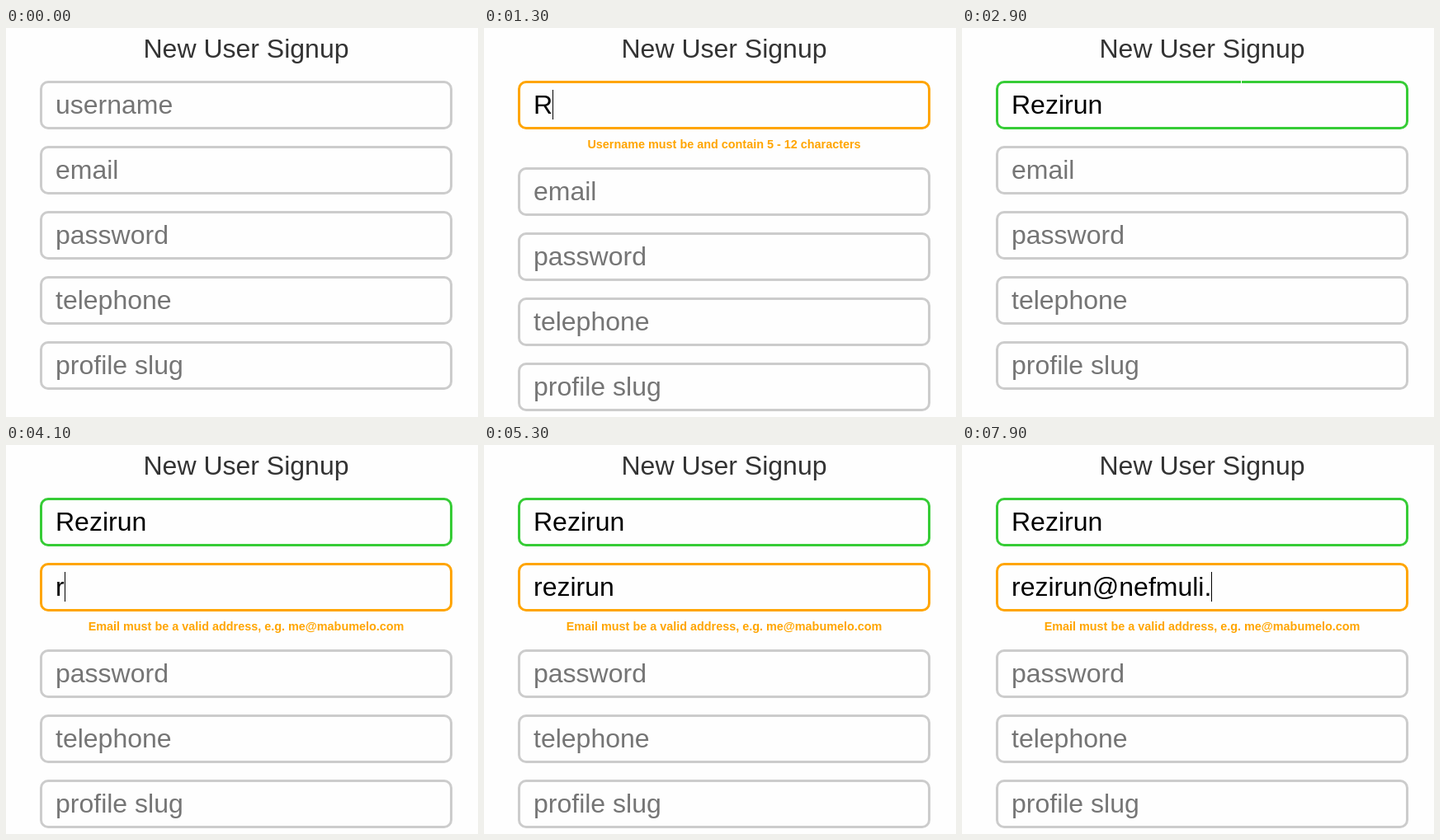
Animation of 572x472 px, one loop 8000 ms. Source, as an HTML page:

```html
<!DOCTYPE html>
<html lang="en">
<head>
<meta charset="utf-8">
<title>New User Signup</title>
<style>
  html, body { margin: 0; width: 100%; height: 100%; overflow: hidden; background: #fefefe; }
  svg { display: block; font: 32px "Liberation Sans", Arial, sans-serif; }
  .title { fill: #333; text-anchor: middle; }
  .box { fill: none; stroke-width: 3; }
  .hint { fill: #ffa500; font-size: 14.4px; font-weight: bold; text-anchor: middle; }
  .pointer { fill: none; stroke: #fefefe; }
</style>
</head>
<body>
<svg id="stage" width="572" height="472" viewBox="0 0 572 472">
  <text class="title" x="291" y="36">New User Signup</text>
</svg>
<script>
const LOOP = 8000, STEP = 100, BLINK = 500;
const GREY = '#ccc', ORANGE = '#ffa500', GREEN = '#36cc36';
const TOP = 64, PITCH = 79, HINT_GAP = 26, TEXT_X = 60;

const stage = document.getElementById('stage');

function set(node, attrs) {
  for (const key in attrs) node.setAttribute(key, attrs[key]);
}

function add(tag, attrs, text = '') {
  const node = document.createElementNS('http://www.w3.org/2000/svg', tag);
  set(node, attrs);
  node.textContent = text;
  stage.appendChild(node);
  return node;
}

// A burst types its letters from a start time at an even pace.
const burst = (start, pace, letters) => ({ start, pace, letters });

const fields = [
  {
    label: 'username', focus: 500,
    hint: 'Username must be and contain 5 - 12 characters',
    bursts: [burst(1300, 100, 'Rezi'), burst(1800, 200, 'run')],
    valid: text => /^\w{5,12}$/.test(text)
  },
  {
    label: 'email', focus: 3400,
    hint: 'Email must be a valid address, e.g. me@mabumelo.com',
    bursts: [
      burst(4100, 100, 'rezi'), burst(4600, 100, 'run'), burst(6300, 100, '@'),
      burst(6800, 100, 'nefmul'), burst(7500, 400, 'i.')
    ],
    valid: text => /^\w+@\w+\.\w+$/.test(text)
  },
  { label: 'password' },
  { label: 'telephone' },
  { label: 'profile slug' }
];

for (const field of fields) {
  field.box = add('rect', { class: 'box', x: 42.5, width: 497, height: 56, rx: 8.5 });
  field.text = add('text', { x: TEXT_X });
  field.note = add('text', { class: 'hint', x: 291 }, field.hint);
}

const caret = add('rect', { width: 1, height: 36 });
const pointer = add('path', { class: 'pointer' });

const glides = [
  { start: 200, end: 500, x: 150, y: 108, dx: 8, dy: -5 },
  { start: 2700, end: 3200, x: 390, y: 30, dx: -26, dy: 18 }
];

// Text typed so far, and the time of the last key or focus.
function typing({ focus, bursts = [] }, time) {
  let value = '', last = focus;
  for (const { start, pace, letters } of bursts) {
    if (time < start) break;
    const count = Math.min(letters.length, Math.floor((time - start) / pace) + 1);
    value += letters.slice(0, count);
    last = start + (count - 1) * pace;
  }
  return { value, last };
}

function drawFields(time) {
  let top = TOP;
  for (const field of fields) {
    const { value, last } = typing(field, time);
    const valid = value && field.valid(value);
    const warn = value && !valid;
    Object.assign(field, { top, value, last });
    set(field.box, { y: top + 1.5, stroke: warn ? ORANGE : valid ? GREEN : GREY });
    set(field.text, { y: top + 40, fill: value ? '#000' : '#757575' });
    field.text.textContent = value || field.label;
    set(field.note, { y: top + 82, visibility: warn ? 'visible' : 'hidden' });
    top += PITCH + (warn ? HINT_GAP : 0);
  }
}

function drawCaret(time) {
  const field = fields.filter(({ focus }) => focus <= time).pop();
  const lit = field && Math.floor((time - field.last) / BLINK) % 2 === 0;
  set(caret, { visibility: lit ? 'visible' : 'hidden' });
  if (!lit) return;
  const width = field.value ? field.text.getComputedTextLength() : 0;
  set(caret, { x: Math.round(TEXT_X + width), y: field.top + (field.value ? 11 : 12) });
}

function drawPointer(time) {
  const glide = glides.find(({ start, end }) => time >= start && time < end);
  set(pointer, { visibility: glide ? 'visible' : 'hidden' });
  if (!glide) return;
  const steps = Math.floor((time - glide.start) / STEP);
  const x = glide.x + steps * glide.dx, y = glide.y + steps * glide.dy;
  set(pointer, { d: `M${x + 0.5} ${y - 8}v17m-4 -.5h8m-8 -16h8` });
}

function tick() {
  const time = performance.now() % LOOP;
  drawFields(time);
  drawCaret(time);
  drawPointer(time);
  requestAnimationFrame(tick);
}
tick();
</script>
</body>
</html>
```
